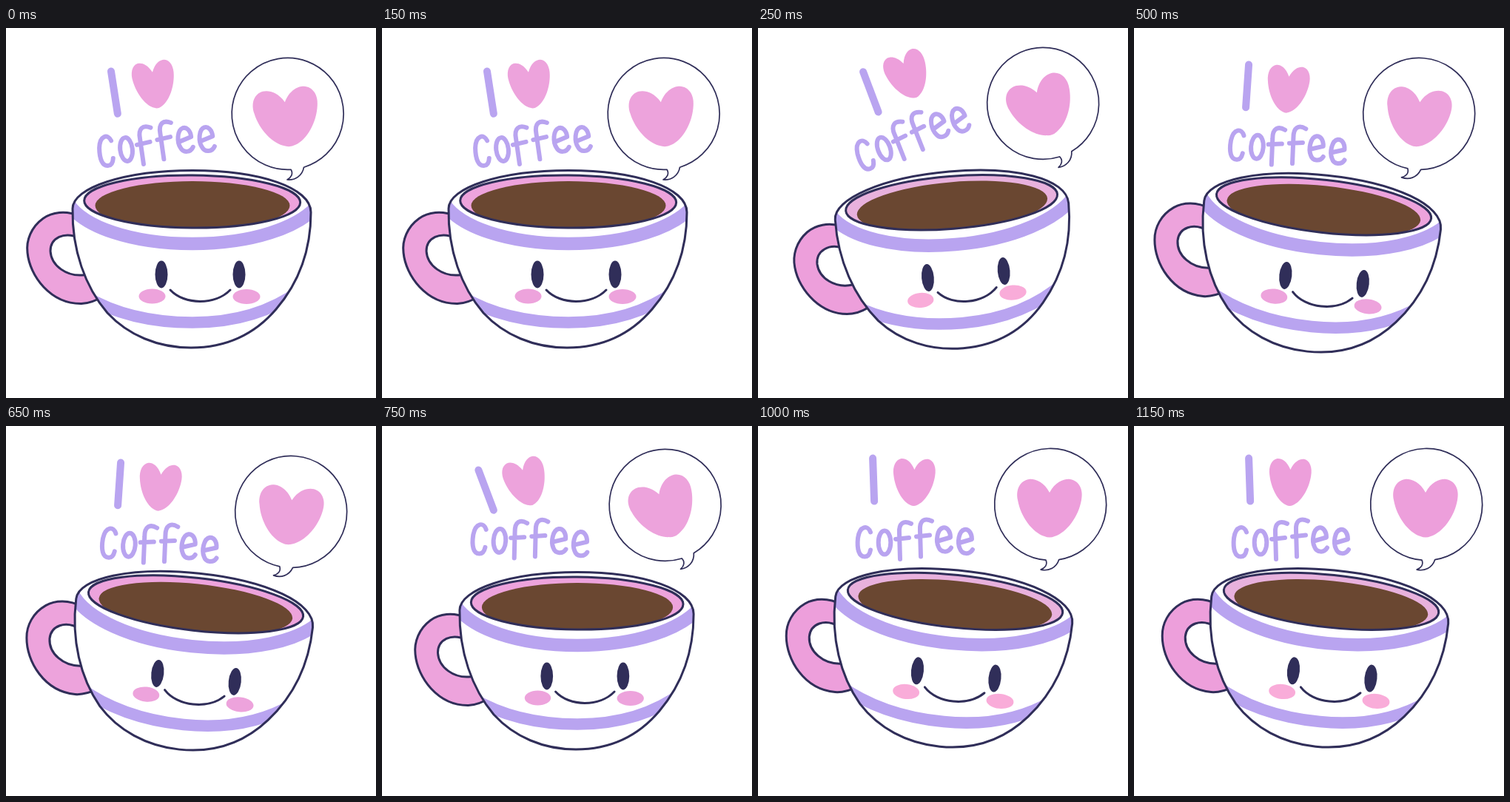
Recreate the animation shown at these times as an HTML page. Size 500 px wide and 500 px high, loop 1.25 s.

```html
<!DOCTYPE html>
<html lang="en">
<head>
<meta charset="utf-8">
<title>I love coffee</title>
<style>
  html, body { margin: 0; width: 100%; height: 100%; overflow: hidden; background: #fff; }
  svg { display: block; width: 100vw; height: 100vh; }
  svg { --pink: #eda3dc; --rim: #eda3dc; --cheek: #eda3dc; }
  svg.bright { --pink: #ed9fdb; --rim: #e8b1dd; --cheek: #f9acd9; }
  .ink { stroke: #302e59; stroke-width: 3; stroke-linecap: round; stroke-linejoin: round; }
  .pink { fill: var(--pink); }
  .band { fill: none; stroke: #b9a4f0; }
  .letters { fill: none; stroke: #b9a4f0; stroke-linecap: round; stroke-linejoin: round; }
</style>
</head>
<body>
<svg id="stage" viewBox="0 0 500 500" role="img" aria-label="I love coffee">
  <defs>
    <path id="heart" d="M0 -21C8 -36 20 -40 28 -39C40 -37 46 -25 43 -11C39 12 23 33 7 38Q0 41 -7 38C-23 33 -39 12 -43 -11C-46 -25 -40 -37 -28 -39C-20 -40 -8 -36 0 -21Z"/>
    <path id="body" d="M-162 -66C-162 -94 -92 -117.500 0 -117.500C92 -117.500 160 -94 160 -61C160 -10 143 35 113 70C83 105 43 122 -2 122C-47 122 -87 105 -115 75C-145 40 -163 -10 -162 -66Z"/>
    <ellipse id="rim" cx="-1" cy="-75.500" rx="146" ry="35.500" transform="rotate(.5)"/>
    <clipPath id="inBody"><use href="#body"/></clipPath>
    <clipPath id="inRim"><use href="#rim"/></clipPath>
    <path id="f" d="M-4 25L-5 -10C-6 -24 1 -28 11 -23M-10 -2L8 -4"/>
    <path id="e" d="M-8 2L9 -3C9 -12 4 -17 -1 -16C-9 -14 -11 2 -7 10C-4 18 6 18 10 11"/>
  </defs>

  <g id="cup">
    <g class="ink" transform="translate(-177 1)">
      <path class="pink" d="M25 -57C5 -65 -13 -62 -25 -53.500C-41 -42 -48 -24 -46 -7.500C-43 24 -15 62 27 61.500C37 61.500 46 58 60 50V-50Z"/>
      <path fill="#fff" d="M25 -27C3 -37 -15 -27 -15 -9.500C-14 10 7 26 32 22.500L50 20V-27Z"/>
    </g>
    <use href="#body" fill="#fff"/>
    <g clip-path="url(#inBody)" class="band">
      <path stroke-width="17.500" d="M-168 -73C-147 -41 -82 -18.500 0 -18.500C82 -18.500 143 -41 168 -69"/>
      <path stroke-width="15.500" d="M-146 52C-102 78 -52 88 0 88C53 88 103 76 146 44"/>
    </g>
    <use href="#body" class="ink" fill="none"/>
    <use href="#rim" fill="var(--rim)"/>
    <ellipse cx="0" cy="-70" rx="131.500" ry="33" fill="#6a4731" clip-path="url(#inRim)"/>
    <use href="#rim" class="ink" fill="none"/>
    <g fill="#302e59">
      <ellipse cx="-42" cy="23" rx="8.500" ry="18.500"/>
      <ellipse cx="63" cy="23" rx="8.500" ry="18.500"/>
    </g>
    <g fill="var(--cheek)">
      <ellipse cx="-54.500" cy="52.500" rx="18" ry="10"/>
      <ellipse cx="73" cy="53" rx="18.500" ry="10"/>
    </g>
    <path class="ink" fill="none" d="M-30 44C-11 64.500 31 64.500 51 44"/>
  </g>

  <path id="bubble" class="ink" fill="#fff" style="stroke-width:1.700" d="M4.500 75.300C8 81 5 86 -.5 89C10 90 20 84 22 72.200A75.500 75.500 0 1 0 4.500 75.300Z"/>
  <use id="bigHeart" href="#heart" class="pink"/>

  <path id="bar" class="letters" stroke-width="10" d="M0 -29V29"/>
  <use id="smallHeart" href="#heart" class="pink"/>
  <g id="word" class="letters" stroke-width="6">
    <path transform="translate(-67.500 1.500)" d="M8.500 -13C5 -23 -6 -22 -8.500 -5C-10 10 -7 20.500 1 20C5 20 7.500 17 8.500 11"/>
    <ellipse cx="-40" cy="2.500" rx="8.300" ry="16"/>
    <use href="#f" x="-15"/>
    <use href="#f" x="13" y="-3.500"/>
    <use href="#e" x="40" y="-1.500"/>
    <use href="#e" x="69" y="1"/>
  </g>
</svg>
<script>
const STEP = 250;

// Key poses: cup and word are x, y, tilt; swing tilts the bubble, the hearts and the "I"
const beats = [
  { cup: [252, 310, 0],    word: [202, 157, -6.5], bubble: [380.5, 116], swing: -8 },
  { cup: [268.5, 311, -5], word: [207, 147, -20],  bubble: [385, 102],   swing: -22 },
  { cup: [249, 316, 6],    word: [206.5, 161, 4],  bubble: [385, 116],   swing: 7 },
  { cup: [264, 315, 0],    word: [199, 154.5, 3],  bubble: [382.5, 107], swing: -22 },
  { cup: [259.5, 312, 5.6], word: [211, 155, 0],   bubble: [395, 106],   swing: 0 }
];

const stage = document.getElementById("stage");
const start = performance.now();
let shown = -1;

function place(id, [x, y, tilt], sx = 1, sy = 1) {
  document.getElementById(id).setAttribute("transform",
    `translate(${x} ${y}) rotate(${tilt}) scale(${sx} ${sy})`);
}

function show(i) {
  const { cup, word, bubble: [bx, by], swing } = beats[i];

  place("cup", cup, i % 2 ? 0.982 : 1);
  place("bubble", [bx, by, swing + 8]);
  place("bigHeart", [bx - 1, by + 5, swing * 0.9]);
  place("word", word);

  // The top line leans further than the cup does
  const lean = 2.6 * cup[2] - 11;
  const angle = lean * Math.PI / 180;
  const hx = word[0] + swing * 0.2;
  const hy = word[1] - 79 + word[2] * 0.2;
  place("smallHeart", [hx, hy, lean * 0.4 + swing * 0.5], 0.65, 0.81);
  place("bar", [hx - 55 * Math.cos(angle), hy - 55 * Math.sin(angle), swing * 0.85 - 2]);

  stage.classList.toggle("bright", i % 3 === 1);
  shown = i;
}

function tick() {
  const i = Math.floor((performance.now() - start) / STEP) % beats.length;
  if (i !== shown) show(i);
  requestAnimationFrame(tick);
}
tick();
</script>
</body>
</html>
```
